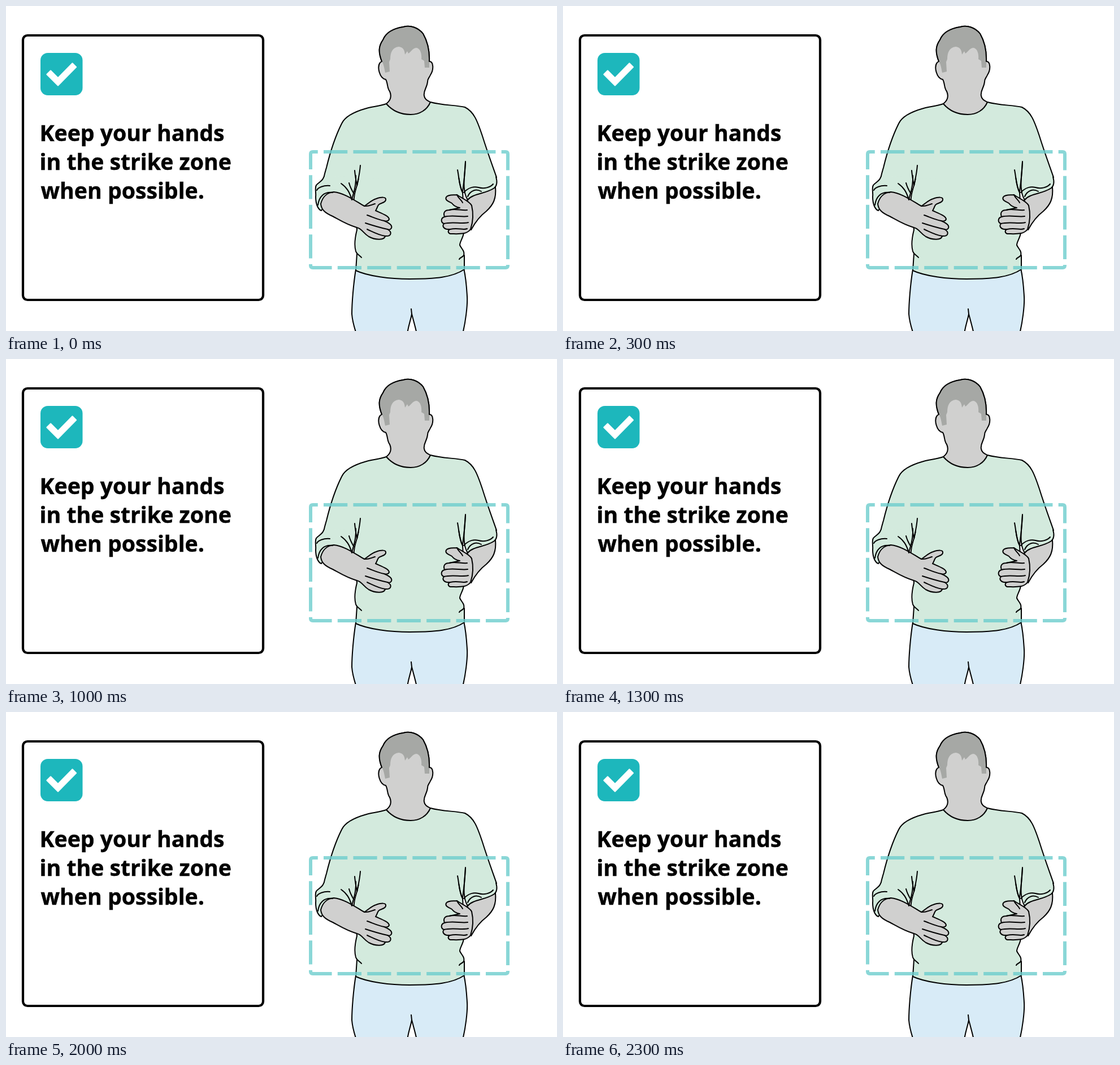
These frames come from a looping animation (975 px wide and 575 px high, 2.5 s). An HTML page:

```html
<!DOCTYPE html>
<html lang="en">
<head>
<meta charset="utf-8">
<title>Keep your hands in the strike zone</title>
<style>
  html, body { margin: 0; width: 100%; height: 100%; overflow: hidden; background: #fff; }
  svg { display: block; width: 975px; height: 575px; }
  text { font: 700 39.2px "Open Sans", sans-serif; stroke: #000; stroke-width: .5px; }
  .skin, .shirt, .jeans, .line { stroke: #000; stroke-width: 2px; stroke-linecap: round; stroke-linejoin: round; }
  .skin { fill: #d0d0cf; }
  .shirt { fill: #d3eadd; }
  .jeans { fill: #d8ebf7; }
  .line { fill: none; }
  .flat { stroke: none; }
  .pose { opacity: 0; }
</style>
</head>
<body>
<svg viewBox="0 0 975 575">
  <rect x="30" y="52" width="425" height="468" rx="8" fill="#fff" stroke="#000" stroke-width="4.2"/>
  <rect x="61" y="83" width="74.5" height="75" rx="13" fill="#1db7bc"/>
  <path d="M72.5 121L79 114.5L92 127.5L117.5 101.5L124 108L92 140.5Z" fill="#fff" stroke="#fff" stroke-width="2.4" stroke-linejoin="round"/>
  <text x="59.5" y="239">Keep your hands</text>
  <text x="59.5" y="290">in the strike zone</text>
  <text x="61.5" y="341">when possible.</text>

  <!-- trousers -->
  <path class="jeans" d="M619 466C615 490 612 525 612 545C613 558 616 568 620 580H710C712 566 716 556 718 545C721 556 724 567 727 580H808C813 560 817 530 816 514C815 495 814 482 810 464Z"/>
  <path class="line" d="M717 536L718 545"/>

  <!-- torso -->
  <path class="shirt flat" d="M638 181L673 173C690 190 735 190 751 170L795 178L813 275C812 300 809 318 808 330C810 355 808 385 810 402C808 412 803 417 803 423C808 430 812 436 810 441V466C790 480 760 483 714 483C680 483 640 478 619 468L621 436C616 420 621 405 621 390C616 375 615 350 617 335L622 318L617 290Z"/>

  <g id="down" class="pose">
    <path class="skin" d="M565 360C566 396 575 420 584 445C591 460 596 470 595 485C594 500 599 512 602 528C606 543 622 551 634 550C638 545 630 540 628 535C622 525 619 511 620 500C627 504 635 503 632 495C631 482 621 476 617 468C616 452 613 436 613 418C613 398 609 380 609 355Z"/>
    <path class="line" d="M620 501C614 497 612 490 612 483M600 505C604 520 609 531 617 537C621 541 628 541 631 544M607 502C612 515 615 527 622 533"/>
    <path class="skin" d="M820 354C823 380 822 400 821 420C820 436 815 455 807 466C803 475 799 485 800 493C805 498 812 490 817 486C818 500 807 512 801 515C797 520 801 523 800 527C800 533 805 531 806 534C814 537 827 530 833 520C841 507 842 496 841 488C844 474 850 460 853 440C859 415 863 390 863 352Z"/>
    <path class="line" d="M817 486L819 478M829 489C825 503 815 514 802 521M836 494C833 511 821 525 805 529M802 516C809 514 814 511 817 506"/>
    <g class="shoulders"></g>
    <path class="shirt flat" d="M562 303C558 318 557 332 559 338C575 342 597 343 613 337C619 328 621 314 619 300ZM812 300C810 312 812 322 817 331C830 341 850 338 869 332L868 303Z"/>
    <path class="line" d="M561 306C558 320 557 330 558 338M617 290C621 312 618 329 613 338M813 275C812 300 808 318 816 331M868 302C870 312 870 326 868 336"/>
    <path class="shirt" d="M559 338C575 342 598 343 612 337C617 343 616 350 609 355C593 362 578 364 565 362C557 359 556 347 559 338Z"/>
    <path class="shirt" d="M816 332C830 340 850 337 867 332C868 342 867 352 863 356C858 342 835 344 820 357C813 350 813 339 816 332Z"/>
    <path class="line" d="M585 325C596 328 605 331 614 331M559 347C563 345 569 345 573 347M588 352C598 352 606 349 613 345M828 328C841 328 850 325 857 319M817 342C822 339 829 339 833 336"/>
  </g>

  <g id="mid" class="pose">
    <g class="shoulders"></g>
    <path class="shirt" d="M562 303C561 309 553 312 549 317C546 323 549 329 548 338C548 350 552 360 558 362L577 333L612 344C613 333 620 325 619 300" />
    <path class="skin" d="M557 350C560 338 568 330 580 329C600 331 618 345 634 354C641 350 647 343 655 341C664 338 673 337 672 343C671 349 662 348 659 352C656 357 656 360 654 362C665 367 677 371 678 377C677 381 672 381 669 380C679 384 684 388 682 393C680 396 677 396 675 395C684 400 682 408 671 407C670 414 655 415 642 408C632 402 630 394 621 392C603 387 591 379 578 372C564 366 558 360 557 350Z"/>
    <path class="line" d="M634 354C642 355 648 351 653 350M669 380C658 378 648 373 639 370M675 395C661 392 648 388 636 384M671 407C658 405 648 399 639 395M573 318C562 317 552 321 550 326M578 330C562 328 554 338 552 352M593 314C603 321 608 329 612 343M607 313C609 321 612 326 615 331"/>
    <path class="skin" d="M816 340C832 326 851 323 866 320C868 341 862 352 850 363C838 372 830 383 823 396Z"/>
    <path class="shirt flat" d="M812 300L810 330L817 343C829 330 848 332 865 321C869 316 869 310 867 301Z"/>
    <path class="line" d="M813 275C812 300 806 326 817 343C827 331 848 333 864 322C870 317 869 309 867 302M810 330C818 321 828 319 836 321C846 324 857 321 862 315M817 337C822 326 832 323 841 328"/>
    <path class="skin" d="M779 338C783 333 792 335 798 334C806 340 820 345 824 353C828 370 825 386 822 395C815 405 800 403 786 403C781 401 782 396 786 395C775 396 771 390 775 385C769 383 769 375 776 373C773 365 777 361 784 361L803 357C797 356 792 353 789 349C784 346 776 344 779 338Z"/>
    <path class="line" d="M798 334C800 340 806 343 808 348M784 361C794 358 806 362 816 361M776 373C790 369 806 374 817 372M775 385C790 381 806 386 818 383M786 395C800 392 810 397 816 394"/>
  </g>

  <g id="up" class="pose">
    <path class="shirt flat" d="M640 180L622 214L600 290L598 335L613 330L622 318L640 300ZM792 177L828 230L826 335L808 328L790 290Z"/>
    <path class="line" d="M673 173C661 177 649 178 636 181M751 170C768 175 780 174 795 178"/>
    <path class="shirt" d="M587 204C580 227 564 249 553 264C544 277 542 285 538 288C529 293 528 307 533 319C535 340 544 354 562 357C582 358 602 345 613 330L616 300L600 300L593 218Z"/>
    <path class="skin" d="M588 222C592 194 591 168 598 155C602 146 606 137 612 133C616 125 625 122 629 125C636 123 637 131 631 136C623 143 624 151 621 161C621 168 622 172 624 175C628 165 634 157 640 160C645 165 640 178 635 185C630 200 629 208 625 215C614 242 604 278 601 300C600 323 587 337 566 337C548 337 537 324 541 303C546 282 568 254 588 222Z"/>
    <path class="line" d="M612 133C607 145 606 155 604 163C604 172 608 178 610 184M629 125C621 130 616 139 613 148C611 160 610 170 614 178M631 136C625 138 621 143 620 150M624 175L621 182M595 222C598 226 603 226 606 224M541 290C535 298 536 306 538 315M600 313C605 310 611 309 615 305M602 321C607 323 611 317 614 311M617 290C619 308 616 320 612 329"/>
    <path class="shirt" d="M813 275C812 300 809 315 808 328C816 344 831 354 849 355C865 356 876 350 881 335C885 320 885 302 881 288L824 300Z"/>
    <path class="skin" d="M798 186C792 178 790 168 796 166C804 166 808 180 814 186C820 189 819 182 821 178C822 171 820 166 817 162C810 158 811 155 814 153C807 149 807 146 812 143C806 142 804 138 806 134C810 130 815 132 820 136C833 137 841 142 844 152C851 159 853 166 853 173C858 189 859 204 857 216C860 233 876 260 880 285C885 311 874 335 853 335C833 336 822 326 823 308C824 285 829 256 826 228C823 215 808 203 798 186Z"/>
    <path class="line" d="M812 143C825 144 836 147 843 154M814 153C826 154 836 159 842 165M817 162C828 163 836 169 840 176M821 178C825 181 826 186 825 190M829 222C831 229 835 231 841 231M819 320C828 340 840 346 856 345C869 343 877 334 882 318M812 315C816 327 822 334 829 338M873 325C878 319 881 310 882 301"/>
  </g>

  <!-- seams and hem -->
  <path class="line" d="M627 282C626 300 622 315 618 328C614 342 615 356 616 368C617 380 621 384 621 396C617 412 616 424 619 434C621 440 626 441 629 445M621 438L619 468C640 478 680 483 714 483C760 483 790 480 811 466V441M799 290C802 305 802 319 808 330C810 355 808 385 810 402C808 412 803 417 803 423C806 430 812 433 810 441C808 445 804 444 802 448" id="seams"/>
  <g id="front"></g>

  <!-- head -->
  <path class="skin" d="M673 173C682 166 682 158 679 151C674 145 676 137 672 130C661 128 656 108 662 100L665 98C658 80 660 70 667 60C673 45 690 39 703 37C716 33 730 39 738 49C742 56 750 72 749 98C757 98 757 113 751 122C749 127 746 128 746 134C745 145 738 150 740 159C741 166 747 168 751 170C745 184 732 192 716 192C700 192 685 187 673 173Z"/>
  <path fill="#a6a8a5" d="M665 98C658 80 660 70 667 60C673 45 690 39 703 37C716 33 730 39 738 49C742 56 750 72 749 98V109H741L740 97L735 94C736 84 733 75 726 74C719 75 717 81 712 84L710 80L706 86C705 76 702 73 695 72C684 73 680 82 680 94L678 99L679 116L671 118C669 108 668 102 665 98Z"/>
  <path class="line" d="M665 98C658 80 660 70 667 60C673 45 690 39 703 37C716 33 730 39 738 49C742 56 750 72 749 98"/>

  <!-- strike zone -->
  <path d="M562 258H884Q888 258 888 262V459Q888 463 884 463H543Q539 463 539 459V262Q539 258 543 258Z" pathLength="2100" stroke-dasharray="80.5 19.5" fill="none" stroke="#6dcdce" stroke-width="6" opacity=".8"/>
</svg>
<script>
  const STEP = 500;
  const poses = ["mid", "up", "mid", "down", "mid"];
  const $ = id => document.getElementById(id);

  const shoulders = "M562 306C563 299 565 293 567 286C574 257 584 228 594 208C600 195 620 186 638 181C650 178 661 177 673 173C690 190 735 190 751 170C772 176 795 175 812 179C828 187 834 203 843 230C852 259 860 280 868 303";
  for (const g of document.querySelectorAll(".shoulders"))
    g.innerHTML = `<path class="shirt" d="${shoulders}"/>`;

  // Hands and forearms lie over the shirt seams; the sleeves share one layer with them.
  $("front").append($("down"), $("mid"), $("up"));
  for (const id of ["down", "mid", "up"]) {
    const armpits = document.createElementNS("http://www.w3.org/2000/svg", "path");
    armpits.setAttribute("class", "line");
    armpits.setAttribute("d", "M627 282C626 296 623 308 621 318M617 291C618 303 620 311 621 318M799 290C802 305 802 319 808 330M813 276C812 298 810 314 808 328");
    $(id).append(armpits);
  }

  for (const id of new Set(poses)) {
    const frames = poses.map((p, i) => ({
      opacity: p === id ? 1 : 0, offset: i / poses.length, easing: "step-end"
    }));
    frames.push({ opacity: frames.at(-1).opacity, offset: 1 });
    $(id).animate(frames, { duration: STEP * poses.length, iterations: Infinity });
  }
</script>
</body>
</html>
```
